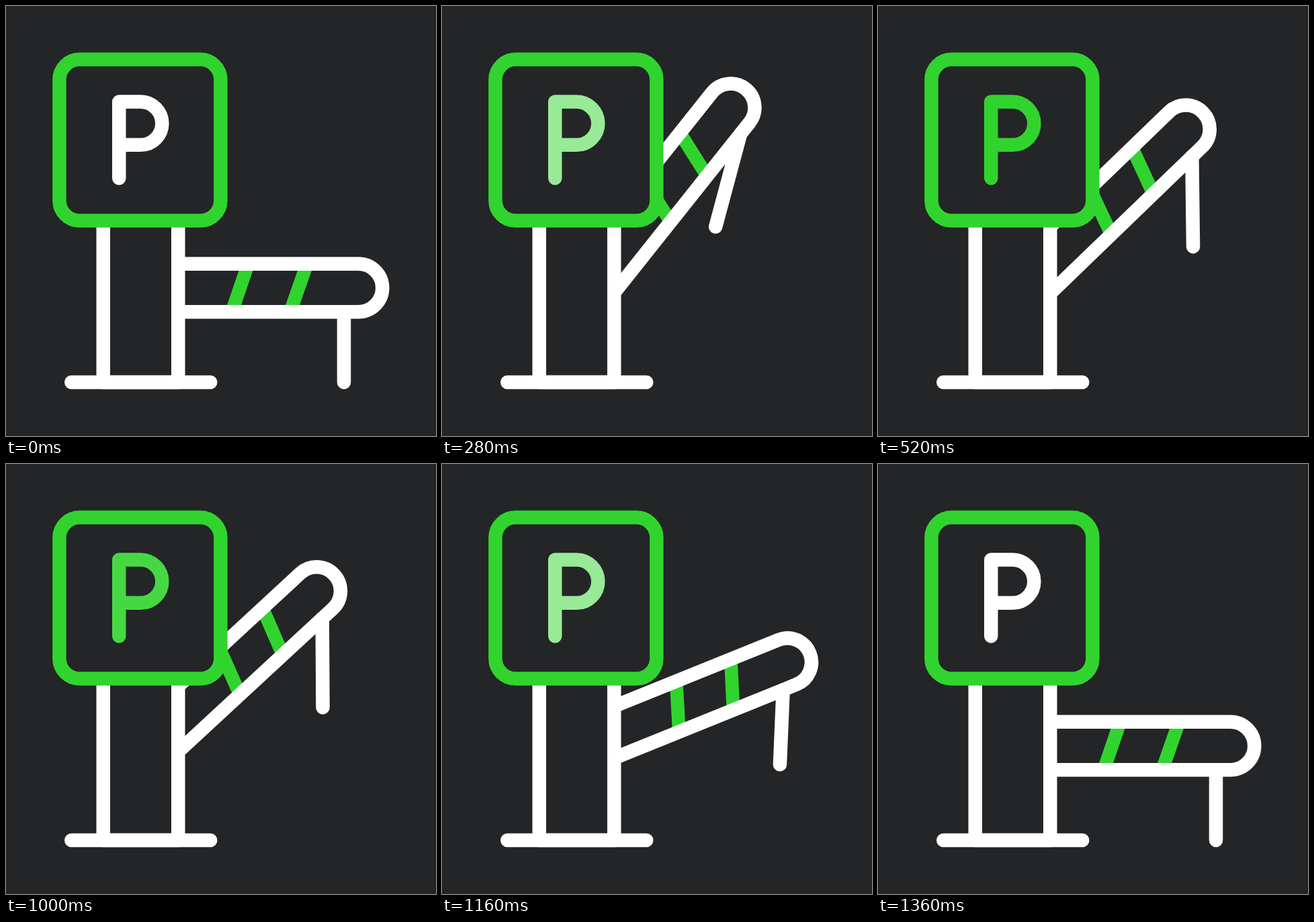
Animation, 640 px wide and 640 px high, one loop 2000 ms. Source, as an HTML page:

```html
<!DOCTYPE html>
<html lang="en">
<head>
<meta charset="utf-8">
<title>Parking barrier</title>
<style>
  html, body { margin: 0; width: 100%; height: 100%; overflow: hidden; background: #242527; }
  svg { display: block; width: 100%; height: 100%; }
  path, rect { fill: none; stroke: #fff; stroke-width: 20.5; stroke-linejoin: round; }
  .round { stroke-linecap: round; }
  .green { stroke: #31d42e; }
  .stripe { stroke-width: 19.8; }
  .solid { fill: #242527; }
</style>
</head>
<body>
<svg viewBox="0 0 640 640">
  <g id="arm">
    <path class="green stripe" d="M161.4 0L137.1 71.5M249 0L224 71.5"/>
    <path d="M0 0H325.5a35.75 35.75 0 0 1 0 71.5H0"/>
    <path id="leg" class="round"/>
  </g>
  <rect class="solid" x="144.75" y="310" width="111.5" height="250"/>
  <path class="round" d="M97.25 560H304.25"/>
  <rect class="solid green" x="79.4" y="79.6" width="240" height="240" rx="30"/>
  <path id="letter" class="round" d="M168.25 256.25V142.5H200.2a32.15 32.15 0 0 1 0 64.3H168.25"/>
</svg>
<script>
  const LOOP = 2000, STEP = 40;
  const WHITE = [255, 255, 255], GREEN = [49, 212, 46];
  const [arm, leg, letter] = ['arm', 'leg', 'letter'].map(id => document.getElementById(id));

  // Arm angle and leg end point (in arm coordinates) for each pose.
  const closed = [0, 304, 176.25];
  const overshoot = [55.6, 162.3, 124.7];
  const open = [44, 212, 169.2];

  const poseKeys = [[80, closed], [320, overshoot], [520, open], [960, open], [1360, closed]];
  const colorKeys = [[80, WHITE], [480, GREEN], [960, GREEN], [1360, WHITE]];

  const linear = p => p;
  const smooth = p => p * p * (3 - 2 * p);

  function sample(keys, t, ease) {
    const next = keys.findIndex(([time]) => t < time);
    if (next === 0) return keys[0][1];
    if (next < 0) return keys[keys.length - 1][1];
    const [t0, from] = keys[next - 1], [t1, to] = keys[next];
    const p = ease((t - t0) / (t1 - t0));
    return from.map((v, i) => v + (to[i] - v) * p);
  }

  function draw(now) {
    const t = Math.floor((now % LOOP) / STEP) * STEP;
    const [angle, x, y] = sample(poseKeys, t, smooth);
    arm.setAttribute('transform', `translate(199 383.75) rotate(${-angle})`);
    leg.setAttribute('d', `M304 71.5L${x} ${y}`);
    letter.style.stroke = `rgb(${sample(colorKeys, t, linear).map(Math.round)})`;
  }

  let start;
  function tick(now) {
    start ??= now;
    draw(now - start);
    requestAnimationFrame(tick);
  }
  draw(0);
  requestAnimationFrame(tick);
</script>
</body>
</html>
```
